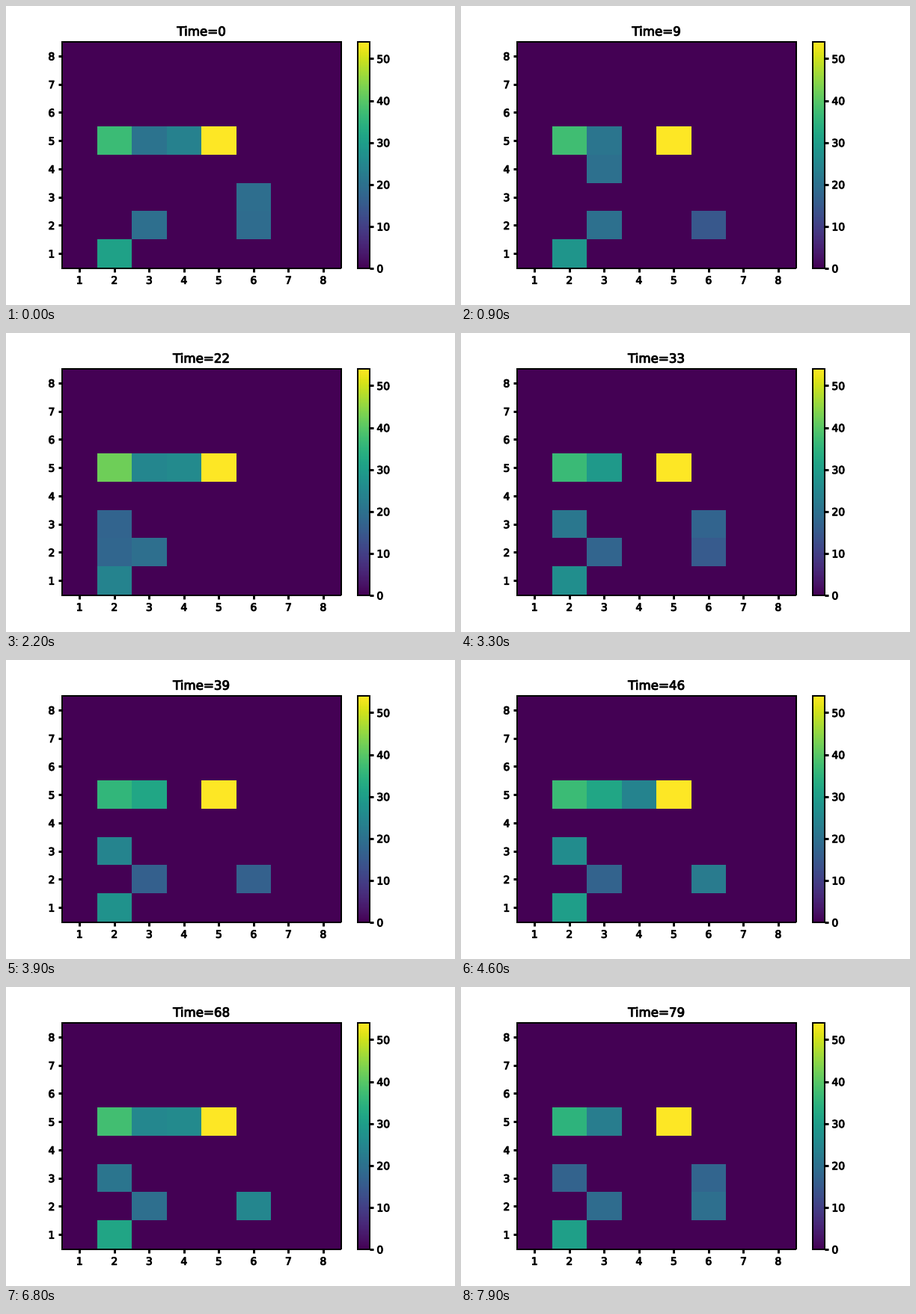
A matplotlib script that plays this animation: 600 px wide and 400 px high, repeating every 8 s.

```python
import numpy as np
import matplotlib.pyplot as plt
from matplotlib import patheffects
from matplotlib.animation import FuncAnimation

FRAMES, STEP = 80, 100
SIZE, PEAK = 8, 54
FLOOR = 14  # weaker readings show as empty
PIXEL = 0.72  # one pixel in points

# Each active cell follows a wave: (column, row): mean, swing, crest, period
WAVES = {
    (2, 5): (38, 3, 22, 35),
    (3, 5): (26, 6, 45, 90),
    (4, 5): (14, 11, 0, 23),
    (2, 1): (29, 4, 62, 80),
    (3, 2): (19, 2, 8, 60),
    (6, 2): (19, 6, 62, 80),
    (6, 3): (13, 7, 2, 27),
    (2, 3): (19, 7, 50, 100),
    (3, 4): (8, 12, 9, 48),
    (2, 2): (-30, 48, 22, 80),
}
STEADY = (5, 5)

plt.rcParams.update({
    "font.family": "DejaVu Sans",
    "font.size": 10,
    "axes.linewidth": 2 * PIXEL,
    "xtick.major.width": 3 * PIXEL,
    "ytick.major.width": 3 * PIXEL,
})


def build_readings():
    rng = np.random.default_rng(5)
    times = np.arange(FRAMES)
    data = np.zeros((FRAMES, SIZE, SIZE))
    for (col, row), (mean, swing, crest, period) in WAVES.items():
        wave = mean + swing * np.cos(2 * np.pi * (times - crest) / period)
        noisy = wave + rng.uniform(-1.5, 1.5, FRAMES)
        data[:, row - 1, col - 1] = np.where(wave < FLOOR, 0, noisy)
    data[:, STEADY[1] - 1, STEADY[0] - 1] = PEAK
    return data


def embolden(texts):
    for text in texts:
        text.set_path_effects([patheffects.withStroke(linewidth=0.7,
                                                      foreground="black")])


readings = build_readings()

fig, ax = plt.subplots(figsize=(6, 4), dpi=100)
fig.subplots_adjust(left=0.125, right=0.9003, bottom=0.125, top=0.88)
for side in ("right", "bottom"):
    ax.spines[side].set_position(("outward", PIXEL))

edges = np.arange(SIZE + 1) + 0.5
mesh = ax.pcolormesh(edges, edges, readings[0], cmap="viridis",
                     vmin=0, vmax=PEAK)
ax.set_xticks(range(1, SIZE + 1))
ax.set_yticks(range(1, SIZE + 1))
title = ax.set_title("Time=0", fontsize=12)

bar = fig.colorbar(mesh, ax=ax, ticks=range(0, PEAK, 10),
                   aspect=19.8, shrink=1.003, anchor=(0, 1))
bar.outline.set_linewidth(2 * PIXEL)
embolden([title, *ax.get_xticklabels(), *ax.get_yticklabels(),
          *bar.ax.get_yticklabels()])


def update(time):
    mesh.set_array(readings[time])
    title.set_text(f"Time={time}")
    return mesh, title


anim = FuncAnimation(fig, update, frames=FRAMES, interval=STEP,
                     repeat=True, repeat_delay=0, blit=False)
plt.show()
```
